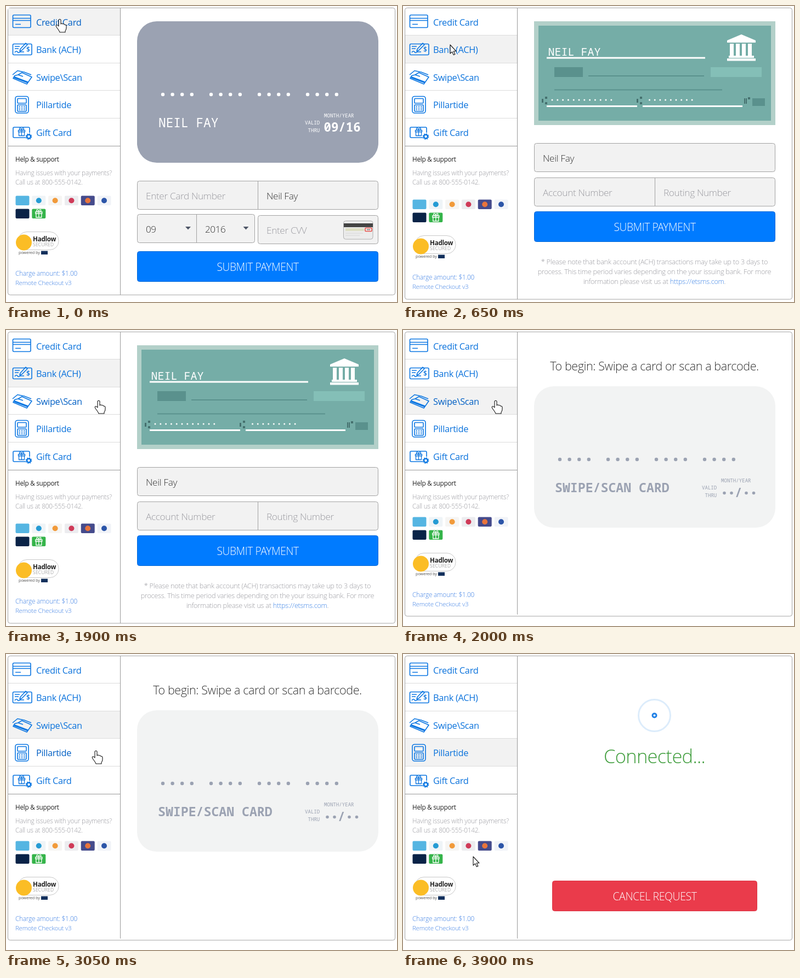
Write an HTML page that moves like this. It is 713 by 542 pixels and loops after 3950 ms.

```html
<!DOCTYPE html>
<html lang="en">
<head>
<meta charset="utf-8">
<title>Payment form</title>
<style>
html, body { margin: 0; width: 100%; height: 100%; overflow: hidden; background: #fff; }
svg { display: block; }
text { font-family: "Open Sans", "Noto Sans", sans-serif; font-weight: 300; letter-spacing: -.02em; white-space: pre; }
.mono { font-family: "Noto Sans Mono", "DejaVu Sans Mono", monospace; font-weight: 400; letter-spacing: 0; }
.mid { text-anchor: middle; }
.icon { fill: none; stroke: #0a76e2; stroke-width: 1.6; stroke-linejoin: round; }
</style>
</head>
<body>
<svg id="stage" width="713" height="542" viewBox="0 0 713 542"></svg>
<script>
const LOOP = 3950, BLUE = '#007bff', LINK = '#0a72dc', GREY = '#9a9aa0', DARK = '#333', SLATE = '#9ba2b2';

const text = (x, y, s, size, fill, attrs = '') =>
  `<text x="${x}" y="${y}" font-size="${size}" fill="${fill}" ${attrs}>${s}</text>`;
const mono = (x, y, s, size, fill, weight = 400) =>
  text(x, y, s, size, fill, `class="mono" style="font-weight:${weight}"`);
const box = (x1, y1, x2, y2, fill, r = 0, attrs = '') =>
  `<rect x="${x1}" y="${y1}" width="${x2 - x1}" height="${y2 - y1}" rx="${r}" fill="${fill}" ${attrs}/>`;
const path = (d, attrs = '') => `<path d="${d}" ${attrs}/>`;
const line = (d, stroke, width = 1) => path(d, `fill="none" stroke="${stroke}" stroke-width="${width}"`);
const dot = (x, y, r, fill) => `<circle cx="${x}" cy="${y}" r="${r}" fill="${fill}"/>`;
const dots = (n, x, y, step, r, fill, skip = () => false) =>
  Array.from({ length: n }, (_, i) => skip(i) ? '' : dot(x + i * step, y, r, fill)).join('');
const group = (id, body, attrs = '') => `<g id="${id}" ${attrs}>${body}</g>`;

const field = (x1, y1, x2, y2, divider) =>
  box(x1 + .5, y1 + .5, x2 - .5, y2 - .5, '#f2f2f2', 4, 'stroke="#a2a2a2"') +
  (divider ? line(`M${divider}.5 ${y1}V${y2}`, '#a2a2a2') : '');
const button = (x1, y1, x2, y2, label, size, fill, edge) =>
  box(x1 + .5, y1 + .5, x2 - .5, y2 - .5, fill, 4, `stroke="${edge}"`) +
  text((x1 + x2) / 2, y1 + 36, label, size, '#fff', 'class="mid"');
const submit = y => button(239, y, 679, y + 56, 'SUBMIT PAYMENT', 19.2, BLUE, '#0067d6');
const cardDots = (y, fill) => dots(19, 286, y, 17.6, 3.2, fill, i => i % 5 == 4);
const validity = (y, fill) =>
  mono(580, y, 'MONTH/YEAR', 9.1, fill) + mono(545, y + 13, 'VALID', 9.1, fill) + mono(550.5, y + 27, 'THRU', 9.1, fill);
const gift = (x, y, color) =>
  path(`M${x - 6} ${y - 4}h12v3h-12zM${x - 5} ${y - 1}h10v7h-10zM${x} ${y - 4}v10M${x} ${y - 4}c-5 0-5-5-2-4q2 1 2 4q0-3 2-4c3-1 3 4-2 4`,
    `fill="none" stroke="${color}" stroke-width="1.3"`);

// Menu
const labels = ['Credit Card', 'Bank (ACH)', 'Swipe\\Scan', 'Pillartide', 'Gift Card'];
const rowTop = [4, 54, 105, 155, 206, 256];
const icons = [
  box(12.5, 16.5, 45, 39.5, 'none', 2) + path('M12.5 22.5H45M12.5 26.5H45M17 33.5H27'),
  box(12.5, 69.5, 47, 89.5, 'none', 2) +
    path('M16 74h9M16 78h7M16 85q3-4 5-1t5 0h7M25 83l1-4L36 68l3 3L29 81z') +
    text(37, 84, '$', 12, LINK, 'stroke="none" style="font-weight:600"'),
  path('M12 126L21 118.5 33 121 46 126M22 126L29 122 47 130 38 143 13 132.5 16 127.5 22 126 31 129') +
    path('M15 130.5L40 140', 'stroke-width="3"'),
  box(17, 165.5, 41, 196, 'none', 4) + box(21, 169.5, 37, 178, 'none', 1) + box(21, 181, 37, 193, 'none', 1) +
    [184, 187, 190].map(y => path(`M23.5 ${y}h2.5m1.8 0h2.5m1.8 0h2.5`)).join(''),
  path('M36 241H15q-2 0-2-2V224q0-2 2-2H41q2 0 2 2V232') + gift(28.5, 231.5, LINK) +
    `<circle cx="41.5" cy="239" r="3.4" stroke-width="2.4"/><circle cx="41.5" cy="239" r="5" stroke-dasharray="2 1.93" stroke-width="1.6"/>`
];
const menu = group('highlight', '') + labels.map((label, i) =>
  text(55, [36, 86, 137, 187, 238][i], label, 16.4, LINK, 'class="label" style="font-weight:400"')).join('') +
  `<g class="icon">${icons.join('')}</g>` +
  rowTop.slice(1, 5).map(y => line(`M4 ${y - .5}H208`, '#dcdcdc')).join('') +
  line('M4 256.5H208', '#999') +
  text(17, 285, 'Help &amp; support', 11.7, '#222', 'style="font-weight:400"') +
  text(17, 310, 'Having issues with your payments?', 11.8, GREY) +
  text(17, 327, 'Call us at 800-555-0142.', 11.8, GREY);

// Tile and dot colours of the accepted payment types
const tiles = [['#55b5e2'], ['#eff4f7', '#259bd4'], ['#f6f5f3', '#f19a3a'], ['#ececef', '#cf3a58'],
  ['#454b8c', '#e9743c'], ['#f1f3f8', '#2c55a8'], ['#0a2347'], ['#35b44a']];
const support = tiles.map(([tile, spot], i) => {
  const x = 17.5 + i % 6 * 29.8, y = i < 6 ? 347.5 : 371.5;
  return box(x, y, x + 25, y + 17.5, tile, 2) + (spot ? dot(x + 12.5, y + 8.7, 5, spot) : '');
}).join('') + gift(59.8, 381, '#fff') +
  box(22, 413.5, 96, 446.5, '#fff', 16, 'stroke="#c8c8c8"') + dot(32.5, 433, 14.5, '#fbbd25') +
  text(49, 431, 'Hadlow', 11.6, '#222', 'style="font-weight:700"') +
  text(49, 440, 'SECURED', 8.4, '#777', 'style="letter-spacing:.04em"') +
  text(23, 454, 'powered by', 7.4, '#555', 'style="font-weight:400"') + box(64, 448.5, 76, 455, '#12305c') +
  text(17, 494, 'Charge amount: $1.00', 11.8, '#3f80e4') +
  text(17, 511, 'Remote Checkout v3', 11.5, '#3f80e4');

// Pages
const caret = x => path(`M${x - 5} 404h10l-5 5.5z`, 'fill="#4d5566"');
const credit = box(239, 28, 679, 287, SLATE, 36) + cardDots(162, '#fff') +
  mono(278, 222, 'NEIL FAY', 22.8, '#fff') + validity(204, '#fff') + mono(579.5, 230, '09/16', 22.4, '#fff', 700) +
  field(239, 320, 679, 373, 459) + text(255, 354, 'Enter Card Number', 17.2, GREY) + text(475, 354, 'Neil Fay', 17.2, DARK) +
  field(239, 381, 454, 434, 347) + text(255, 415, '09', 17, DARK) + text(363, 415, '2016', 17, DARK) + caret(332) + caret(437.5) +
  field(459, 383, 679, 436) + text(475, 417, 'Enter CVV', 17.2, GREY) +
  box(615.5, 393.5, 669, 427, '#ececec', 4, 'stroke="#b0b0b0"') + box(616, 398, 669, 405, '#444') +
  box(619, 407, 653, 412, '#dedfc4') + line('M619 416h32M619 420h26', '#d6d6d6') +
  box(655, 406.5, 667, 412.5, '#fff', 1, 'stroke="#e34b45" stroke-width="1.6"') + line('M657.5 409.5h7', '#888', 2) +
  submit(449);

const SHADE = '#5a918d';
const micr = x => box(x, 170, x + 3, 177, '#45706e') + box(x + 6, 166, x + 10, 170, '#45706e') + box(x + 6, 176, x + 10, 180, '#45706e');
const columns = [596, 607, 618, 629].map(x => box(x, 69, x + 7, 91, '#fff')).join('');
const bank = box(239, 28, 679, 218, '#b3d0c9') + box(247, 36, 671, 210, '#75ada7') +
  mono(264.5, 91, 'NEIL FAY', 20, '#fff') + line('M262 95H551', '#fff', 3) +
  path('M617 52L643 63V67H591V63z', 'fill="#fff"') + columns + box(594, 91, 640, 95, '#fff') + box(591, 96, 643, 100.5, '#fff') +
  box(276, 112, 328, 130, SHADE) + line('M338 128H549M276 153.5H582', SHADE, 2) + box(561, 112, 654, 130, '#84bfb7') +
  micr(253) + micr(426) + dots(12, 272, 172, 9.8, 1.5, '#fff') + dots(9, 449.5, 172, 9.7, 1.5, '#fff') +
  line('M262 183.5H427M437 183.5H619', '#fff', 3) + line('M623 169v10M626 169v10', '#45706e', 2) +
  box(629, 167, 633, 171, '#45706e') + box(637, 169, 660, 183, SHADE) +
  field(239, 251, 679, 304) + text(255, 285, 'Neil Fay', 17.2, DARK) +
  field(239, 314, 679, 367, 459) + text(255, 348, 'Account Number', 17.2, GREY) + text(475, 348, 'Routing Number', 17.2, GREY) +
  submit(376) +
  ['* Please note that bank account (ACH) transactions may take up to 3 days to',
    'process. This time period varies depending on the your issuing bank. For more',
    'information please visit us at <tspan fill="#3f85e6">https://etsms.com</tspan>.']
    .map((s, i) => text(458.5, 473 + i * 18, s, 12.7, GREY, 'class="mid"')).join('');

const swipe = text(458.5, 74, 'To begin: Swipe a card or scan a barcode.', 21.55, DARK, 'class="mid"') +
  box(239, 103, 679, 362, '#f2f3f3', 36) + cardDots(237, SLATE) +
  mono(277, 297, 'SWIPE/SCAN CARD', 23.2, SLATE, 600) + validity(279, SLATE) +
  [586, 599, 626, 639.5].map(x => dot(x, 298.5, 2.8, SLATE)).join('') + mono(605, 306, '/', 22.4, SLATE, 700);

const connect = `<circle cx="458.5" cy="112.5" r="29" fill="none" stroke="#dcecfb" stroke-width="3"/>
  <circle id="pulse" cx="458.5" cy="112.5" fill="none" stroke="#1f80e6" stroke-width="3"/>` +
  text(458.5, 200, '', 34.5, '', 'id="status" class="mid"') +
  button(272, 415, 646, 471, 'CANCEL REQUEST', 19.5, '#ea3b4b', '#dc3545');

// Page order matches the menu rows; each has a start time, frame bottom and sidebar shift
const pages = [
  { start: 0, bottom: 529, side: 529, shift: 0, body: credit },
  { start: 650, bottom: 537, side: 537, shift: 7, body: bank },
  { start: 1950, bottom: 524, side: 521, shift: -5, body: swipe },
  { start: 3500, bottom: 524, side: 521, shift: -5, body: connect }
];

const $ = id => document.getElementById(id);
$('stage').innerHTML = box(3.5, 3.5, 709.5, 529, '#fff', 4, 'id="frame" stroke="#a4a4a4"') +
  menu + group('support', support) + path('', 'id="divider" stroke="#999"') +
  pages.map((p, i) => group('page' + i, p.body)).join('') +
  group('cursor', path('M-2 1.5Q0-1 2 1.5V9Q4 7 5.6 9 8 8 9 10.3 12 10 12 13V16Q12 19 10 21.5V24H0Q-1 21-5 16-8 12-6 11-4 10-2 13z', 'id="hand"') +
    path('M0 0V16L3.6 12.8 6.2 18.6 8.8 17.4 6.2 11.8H11z', 'id="arrow"'), 'fill="#fff" stroke="#111" stroke-width="1.1" stroke-linejoin="round"');
const rowLabels = document.querySelectorAll('.label');

// Cursor stops: time, x, y
const route = [[0, 98, 24], [550, 87, 71], [600, 86, 71], [950, 86, 71], [1150, 134, 85], [1450, 166, 96],
  [1550, 168, 100], [1900, 169, 129], [2450, 169, 129], [2700, 167, 156], [3050, 164, 177], [3550, 164, 177], [3900, 128, 371], [LOOP, 128, 371]];
function cursorAt(t) {
  const i = route.findIndex(p => p[0] > t), [t0, x0, y0] = route[i - 1], [t1, x1, y1] = route[i];
  const k = (t - t0) / (t1 - t0);
  return [x0 + (x1 - x0) * k, y0 + (y1 - y0) * k];
}

const show = (id, on) => $(id).setAttribute('display', on ? 'inline' : 'none');

function draw(t) {
  const active = pages.findLastIndex(p => t >= p.start), page = pages[active];
  pages.forEach((p, i) => show('page' + i, i == active));
  $('frame').setAttribute('height', page.bottom - 3.5);
  $('divider').setAttribute('d', `M208.5 4V${page.side}`);
  $('support').setAttribute('transform', `translate(0 ${page.shift})`);
  $('highlight').innerHTML = box(4, rowTop[active], 208, rowTop[active + 1] - 1, '#f2f2f2');

  const [x, y] = cursorAt(t), arrow = t >= 500 && t < 1000 || t >= 3600;
  $('cursor').setAttribute('transform', `translate(${x} ${y})`);
  show('arrow', arrow);
  show('hand', !arrow);
  const hover = arrow ? -1 : Math.floor((y - 6) / 50.5);
  rowLabels.forEach((el, i) => el.setAttribute('fill', i == hover ? '#005fc4' : LINK));

  const connected = t >= 3700;
  $('pulse').setAttribute('r', Math.max(0, 9.6 - (t - 3500) / 400 * 6.1));
  $('status').textContent = connected ? 'Connected...' : 'Connecting';
  $('status').setAttribute('fill', connected ? '#3d9c3a' : '#1f7fe0');
}

const origin = performance.now();
function tick() {
  const t = (performance.now() - origin) % LOOP;
  draw(Math.floor(t / 50) * 50);
  requestAnimationFrame(tick);
}
tick();
</script>
</body>
</html>
```
